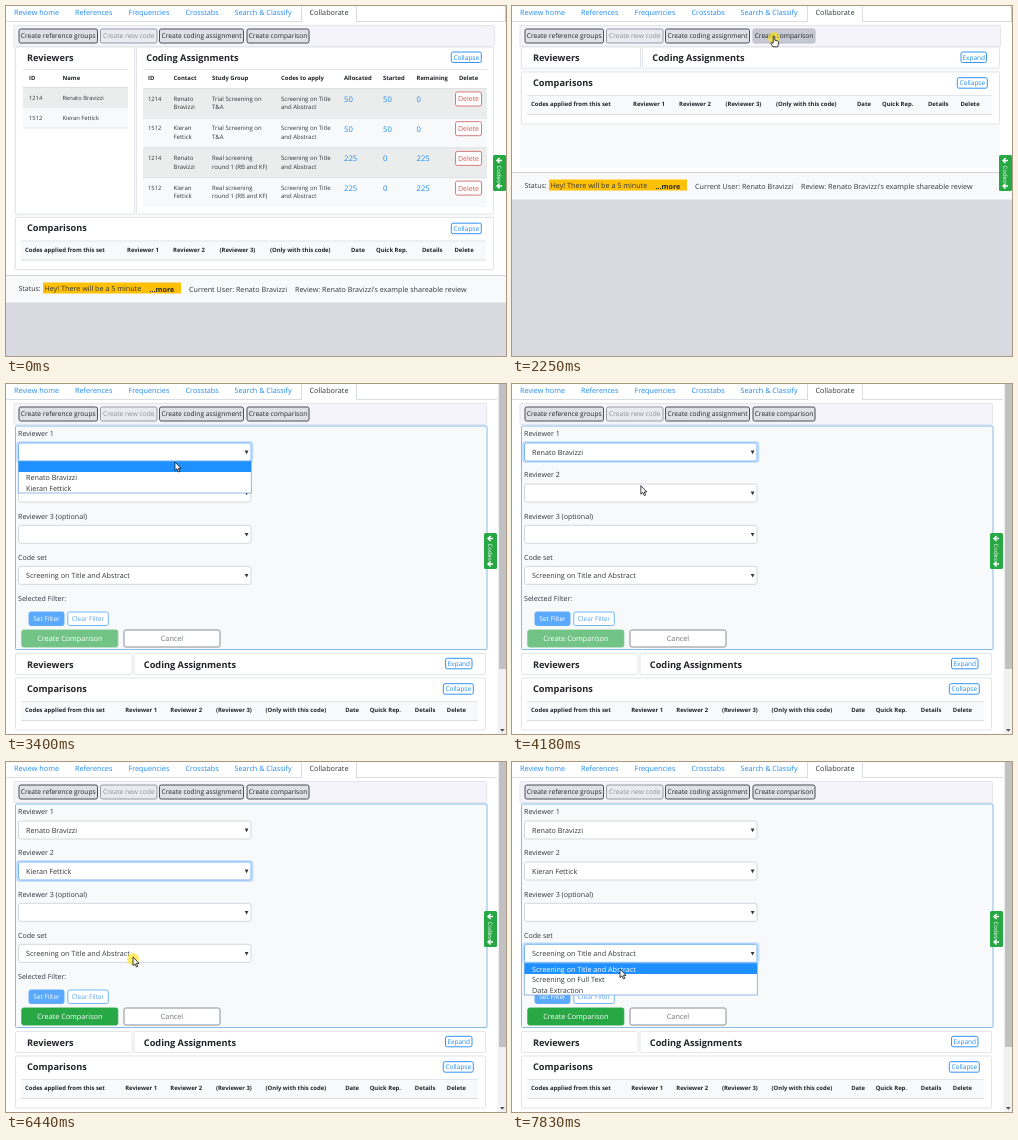
Recreate the animation shown at these times as an HTML page. Size 500 px wide and 350 px high, loop 8 s.

```html
<!DOCTYPE html>
<html lang="en">
<head>
<meta charset="utf-8">
<style>
  html, body { margin: 0; width: 100%; height: 100%; overflow: hidden; background: #fff; }
  svg { position: absolute; left: 0; top: 0; width: 500px; height: 350px; }
  text { font-family: "Open Sans", "Noto Sans", sans-serif; text-rendering: geometricPrecision; white-space: pre; }
</style>
</head>
<body>
<svg id="stage" viewBox="0 0 500 350"></svg>
<script>
const LOOP = 8000;
const INK = '#30353a', LINK = '#1f8af0', BLUE = '#007bff', GREEN = '#28a745', LINE = '#d9dce0', BACKDROP = '#d8d9e1';
const PEOPLE = [['1214', 'Renato Bravizzi'], ['1512', 'Kieran Fettick']];
const NAMES = PEOPLE.map(p => p[1]);
const CODE_SETS = ['Screening on Title and Abstract', 'Screening on Full Text', 'Data Extraction'];

// Drawing helpers
const text = (x, y, str, size = 7.2, fill = INK, extra = '') =>
  `<text x="${x}" y="${y}" font-size="${size}" fill="${fill}" ${extra}>${str.replace(/&/g, '&amp;')}</text>`;
const bold = (x, y, str, size = 5.9) => text(x, y, str, size, '#212529', 'font-weight="700"');
const rect = (x, y, w, h, fill, stroke = 'none', rx = 0, sw = 1) =>
  `<rect x="${x}" y="${y}" width="${w}" height="${h}" fill="${fill}" stroke="${stroke}" stroke-width="${sw}" rx="${rx}"/>`;
const hline = (x1, x2, y, color = LINE) => rect(x1, y, x2 - x1, 1, color);
const button = (x, y, w, h, label, { fill = '#fff', stroke = LINK, color = LINK, size = 6.5, sw = .9 } = {}) =>
  rect(x, y, w, h, fill, stroke, 1.8, sw) +
  text(x + w / 2, y + h / 2 + size * .35, label, size, color, 'text-anchor="middle"');
const card = (x, y, w, h) => rect(x, y, w, h, '#fff', '#e3e5e8', 1.5);
const linkButton = (x, y, w, label, hot) =>
  button(x, y, w, 10.5, label, hot ? { fill: BLUE, stroke: BLUE, color: '#fff' } : {});

// Tabs and toolbar
function header(right, hover) {
  const edge = right + 11;
  let s = rect(0, 0, edge, 16, '#fff') + hline(0, 295, 15) + hline(351, edge, 15) +
    rect(295, -3, 1, 19, LINE) + rect(350, -3, 1, 19, LINE);
  [[8, 'Review home'], [69, 'References'], [122.5, 'Frequencies'], [179.5, 'Crosstabs'], [228.5, 'Search & Classify']]
    .forEach(([x, label]) => s += text(x, 9.3, label, 7.25, LINK));
  s += text(303.5, 9.3, 'Collaborate', 7.25);
  s += rect(8, 19.5, right - 7.5, 21, '#f4f4fa', '#e4e4ea', 1);
  const look = { fill: '#dfe0e8', stroke: '#3b3e44', color: '#212529', size: 6.65 };
  s += button(13, 23, 78.5, 14, 'Create reference groups', look);
  s += button(94.5, 23, 56.5, 14, 'Create new code', { ...look, fill: '#eaebf1', stroke: '#909299', color: '#8d9096' });
  s += button(153.5, 23, 84, 14, 'Create coding assignment', look);
  s += button(241, 23, 62, 14, 'Create comparison', hover ? { ...look, fill: '#c6c9d3', stroke: '#b4b7c2' } : look);
  return s;
}

function codesTab(x) {
  const arrow = y => `<path d="M${x + 9} ${y}h-5m2.6-2.6l-2.6 2.6 2.6 2.6" fill="none" stroke="#fff" stroke-width="1.4"/>`;
  return rect(x, 149, 13, 36, GREEN, 'none', 1.5) + arrow(154.5) + arrow(180) +
    text(0, 0, 'Codes', 6, '#fff', `transform="translate(${x + 4.3} 159.5) rotate(90)"`);
}

function statusBar(y) {
  return rect(0, y, 500, 28, '#f8f9fa') + hline(0, 500, y, '#cfd2d6') +
    text(12.5, y + 16, 'Status:', 7) + rect(37, y + 7.5, 138, 11, '#ffc107') +
    text(38.5, y + 16, 'Hey! There will be a 5 minute') + bold(143.5, y + 17, '...more', 7.1) +
    text(183, y + 17, `Current User: ${NAMES[0]}`) +
    text(289, y + 17, `Review: ${NAMES[0]}'s example shareable review`) +
    rect(0, y + 27.5, 500, 350, BACKDROP);
}

function comparisons(y, right) {
  const scale = right > 485 ? 1 : .982;
  let s = card(9.5, y, right - 10, 52) + bold(21, y + 13.8, 'Comparisons', 9.2) +
    linkButton(right - 42.7, y + 5.7, 30, 'Collapse') +
    rect(15, y + 23, right - 23, 19, '#f8f9fa') + hline(15, right - 8, y + 23, '#e4e6e9') + hline(15, right - 8, y + 42);
  [[19, 'Codes applied from this set'], [121, 'Reviewer 1'], [167, 'Reviewer 2'], [213.5, '(Reviewer 3)'],
   [264, '(Only with this code)'], [345, 'Date'], [370, 'Quick Rep.'], [416, 'Details'], [448.5, 'Delete']]
    .forEach(([x, label]) => s += bold(19 + (x - 19) * scale, y + 34.3, label));
  return s;
}

function panels(y, h, split, right) {
  return card(9.5, y, split - 10, h) + card(split + 1.5, y, right - split - 2, h) +
    bold(21, y + 14, 'Reviewers', 9.2) + bold(split + 11.3, y + 14, 'Coding Assignments', 9.2);
}

function tables() {
  let s = hline(17, 122, 63, '#e4e6e9') + bold(23, 74, 'ID') + bold(56.5, 74, 'Name');
  PEOPLE.forEach(([id, name], i) => {
    s += rect(17, 82 + i * 20, 105, 20, i ? '#f8f9fa' : '#ebecec') + text(23, 94.3 + i * 20, id, 5.8) +
      text(56.5, 94.3 + i * 20, name, 5.8);
  });
  s += hline(17, 122, 81) + hline(17, 122, 121.5, '#e4e6e9') + hline(137, 481, 63, '#e4e6e9');
  [[142, 'ID'], [167.5, 'Contact'], [206, 'Study Group'], [275, 'Codes to apply'], [338, 'Allocated'],
   [377, 'Started'], [410.5, 'Remaining'], [453, 'Delete']].forEach(([x, label]) => s += bold(x, 74, label));
  const groups = [['Trial Screening on', 'T&A', '50', '50', '0'], ['Real screening', 'round 1 (RB and KF)', '225', '0', '225']];
  for (let i = 0; i < 4; i++) {
    const y = 82 + i * 29.7, [id, name] = PEOPLE[i % 2], g = groups[i >> 1];
    const pair = (x, a, b) => text(x, y + 12.7, a, 6) + text(x, y + 21.2, b, 6);
    s += rect(137, y, 344, 29.7, i % 2 ? '#f8f9fa' : '#ebecec') + hline(137, 481, y, '#e0e2e5') +
      text(142, y + 12.7, id, 5.9) + pair(167.5, ...name.split(' ')) + pair(206, g[0], g[1]) +
      pair(275, 'Screening on Title', 'and Abstract');
    [338, 377, 410.5].forEach((x, k) => s += text(x, y + 14, g[k + 2], 7.7, LINK));
    s += button(449.5, y + 4, 26, 14, 'Delete', { stroke: '#d0706c', color: '#cf5a58', size: 7 });
  }
  return s;
}

function overview(t) {
  const open = t < 1250, y = open ? 269 : 166;
  return rect(0, 16, 500, 300, '#fff') + rect(8, 40, 480, y - 44, '#f8f9fa') +
    header(488, t > 2020) + panels(41, open ? 167 : 21, 129, 488) +
    (open ? tables() + (t > 1020 && rect(444, 45, 32.5, 12.5, '#80bdff', 'none', 2) || '') +
      linkButton(445.3, 46, 30, 'Collapse', t > 700)
      : linkButton(449, 46, 25.5, 'Expand', t < 1540)) +
    comparisons(open ? 211.5 : 66, 488) + statusBar(y) + rect(499, 0, 1, 16, '#ccc') + codesTab(487);
}

// Form
function select(y, label, value, focused) {
  return text(12, y - 6.8, label, 7.1) +
    (focused ? rect(11, y - 1, 235.5, 20, 'none', '#bcdcff', 2.5, 1.6) : '') +
    rect(12.5, y, 232.5, 18, '#fff', focused ? '#6cadf0' : '#ced4da', 2, .9) + text(20, y + 11.7, value) +
    `<path d="M238.7 ${y + 7.6}h3.8l-1.9 3.6z" fill="#343a40"/>`;
}

function list(y, options, active) {
  const rowHeight = 10.7;
  return rect(12.3, y, 233, rowHeight * 3 - .4, '#fff', '#7aa9dc', 0, .8) + options.map((label, i) =>
    (i === active ? rect(12.5, y + i * rowHeight, 232.5, rowHeight, '#1e90ff') : '') +
    text(20, y + i * rowHeight + 8.2, label, 7.2, i === active ? '#fff' : INK)).join('');
}

function form(t) {
  const ready = t >= 5750, focus = t < 3250 ? 0 : t < 4500 ? 1 : t < 6500 ? 2 : 4;
  let s = rect(0, 0, 500, 350, '#fff') + header(480, t < 2680) + rect(9.5, 42, 471.5, 223.5, '#f8f9fb', '#86bce8', 1);
  s += select(59, 'Reviewer 1', t >= 4030 ? NAMES[0] : '', focus === 1) +
    select(100, 'Reviewer 2', ready ? NAMES[1] : '', focus === 2) +
    select(141.3, 'Reviewer 3 (optional)', '', false) +
    select(182.3, 'Code set', CODE_SETS[0], focus === 4) + text(12, 216.7, 'Selected Filter:', 7.1);
  s += button(23, 228, 35, 13.5, 'Set Filter', { fill: '#5aa9fc', stroke: '#5aa9fc', color: '#fff' }) +
    button(61.8, 228, 40.5, 13.5, 'Clear Filter', { stroke: '#62aef5', color: '#55a5f2' });
  const green = ready ? GREEN : '#72c486';
  s += button(15.8, 246, 96, 17, 'Create Comparison', { fill: green, stroke: green, color: '#fff', size: 7.25 }) +
    button(118, 246, 96, 17, 'Cancel', { stroke: '#7c8187', color: '#6c757d', size: 7.25 });
  s += panels(269.5, 21, 126.5, 480) + linkButton(439.5, 274.3, 26.5, 'Expand') + comparisons(294, 480);

  const people = ['', ...NAMES];
  if (t >= 3320 && t < 4030) s += list(77.3, people, t < 3560 ? 0 : 1);
  if (t >= 4570 && t < 5750) s += list(118.3, people, t < 4880 ? 0 : t < 5270 ? 1 : 2);
  if (t >= 6590) s += list(201.3, CODE_SETS, t < 6880 ? 0 : t < 7340 ? 1 : t < 7450 ? 2 : t < 7590 ? 1 : 0);

  return s + rect(491.5, 0, 8.5, 350, '#f1f1f1') + rect(493, 0, 7, 285, '#c1c1c1') +
    '<path d="M494 345h4.6l-2.3 2.8z" fill="#505050"/>' + codesTab(478);
}

// Pointer stops: time, x, y
const PATH = [
  [70, 434, 344], [630, 465, 39], [780, 464, 48], [930, 462, 54], [1400, 462, 54], [2180, 262, 30],
  [2560, 262, 30], [3200, 169, 70], [3400, 169, 78], [3710, 131, 90], [3860, 126, 89], [4000, 126, 89],
  [4330, 131, 111], [4700, 131, 111], [5030, 135, 136], [5350, 130, 146], [5590, 126, 143], [5820, 126, 146],
  [6210, 127, 195], [6670, 127, 195], [6990, 106, 217], [7220, 105, 218], [7370, 105, 226], [7690, 108, 209], [7830, 108, 207]
];
const CLICKS = [[1020, 1250], [2220, 2400], [3200, 3320], [4430, 4570], [5670, 5750], [6400, 6590]];

function pointerAt(t) {
  const i = PATH.findIndex(p => p[0] > t);
  if (i < 0) return PATH[PATH.length - 1].slice(1);
  const [t0, x0, y0] = PATH[i - 1], [t1, x1, y1] = PATH[i];
  const u = (t - t0) / (t1 - t0), e = u * u * (3 - 2 * u);
  return [x0 + (x1 - x0) * e, y0 + (y1 - y0) * e];
}

function pointer(t) {
  if (t < 70) return '';
  const [x, y] = pointerAt(t);
  const hand = (y > 45 && y < 58 && x > 444) || (y > 22 && y < 37 && x > 153 && x < 304);
  const clicking = CLICKS.some(([a, b]) => t >= a && t < b);
  const shape = hand
    ? 'M-.8 .8Q0 -.6 .8 .8V4.2L3.8 5Q4.8 5.4 4.6 7L3.7 10.8H-1L-3.3 7.2Q-3.2 5.8-.8 7.2Z'
    : 'M0 0V8.6L2 6.8L3.4 10L4.8 9.4L3.4 6.4H6Z';
  return (clicking ? `<circle cx="${x}" cy="${y + 2}" r="6" fill="#ffe11a" opacity=".65"/>` : '') +
    `<path d="${shape}" transform="translate(${x} ${y})" fill="#fff" stroke="#111" stroke-width=".8" stroke-linejoin="round"/>`;
}

const stage = document.getElementById('stage');
let shown = '';
function draw(now) {
  const t = now % LOOP;
  const picture = (t < 2330 ? overview(t) : form(t)) + pointer(t);
  if (picture !== shown) stage.innerHTML = shown = picture;
  requestAnimationFrame(draw);
}
const start = performance.now();
draw(0);
function tick() { draw = null; }
</script>
<script>
// Replaces the first scheduled pass with a clock that starts at page load.
</script>
</body>
</html>
```
